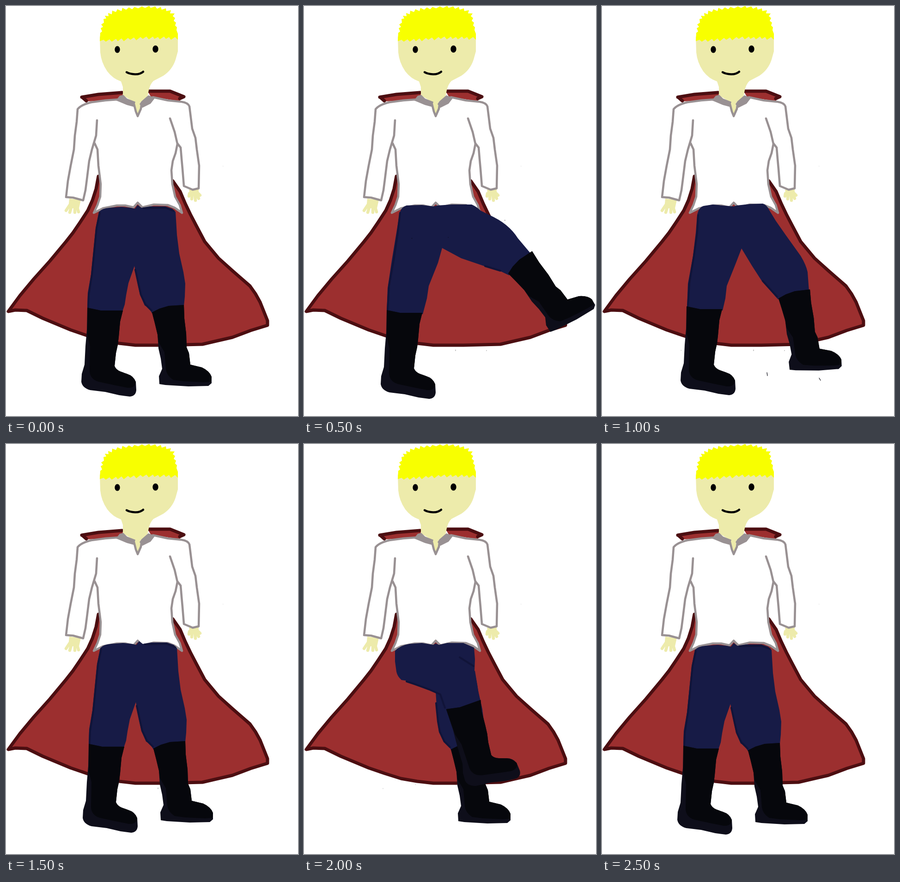
An HTML page for the animation above (3000 ms loop, 632x886 px).

```html
<!DOCTYPE html>
<html lang="en">
<head>
<meta charset="utf-8">
<title>Caped dancer</title>
<style>
  html, body { margin: 0; width: 100%; height: 100%; overflow: hidden; background: #fff; }
  svg { display: block; width: 632px; height: 886px; }
  .line { fill: none; stroke-linecap: round; stroke-linejoin: round; }
  .red { fill: #9c2f2f; }
  .rim { stroke: #4c0e11; stroke-width: 7; }
  .skin { fill: #edebab; }
  .finger { stroke: #edebab; stroke-width: 6.5; }
  .grey { fill: #999193; }
  .seam { stroke: #999193; stroke-width: 4.6; }
  .pants { fill: #171b46; }
  .fold { stroke: #111439; stroke-width: 4; }
  .shade { fill: #0e0e1a; }
  .boot { fill: #06070c; }
  .speck { stroke: #999; stroke-width: 1.2; }
  .dark { stroke: #0a0a14; }
  .pose { visibility: hidden; }
</style>
</head>
<body>
<svg viewBox="0 0 632 886">
  <defs>
    <g id="leftBoot">
      <path class="shade" d="M176 652L205 658 253 658 247 682 244 715 242 732 238 750 235 778Q238 786 248 790L262 795Q276 799 281 812L282 830Q281 843 268 844L245 841 215 834 182 830Q165 825 163 812L164 795 170 775 172 735 175 700Z"/>
      <path class="boot" d="M176 652L205 658 253 658 247 682 244 715 242 732 238 750 235 778Q238 786 248 790L262 795Q276 800 281 813 280 826 263 825L238 820 205 813Q183 809 181 790L182 735 176 710Z"/>
    </g>
    <g id="rightBoot">
      <path class="shade" d="M316 662L332 654 352 648 385 646 386 675 390 708 391 738 396 750 399 775 424 781Q441 789 445 801L445 815 438 821 395 822 345 819 332 817 331 800 338 784 335 762 330 740 328 710 322 685Z"/>
      <path class="boot" d="M316 662L332 654 352 648 385 646 386 675 390 708 391 738 396 750 399 775 424 781Q441 789 445 802L443 812 428 813 385 811 362 808Q348 799 346 785L343 748 330 726 328 710 322 685Z"/>
    </g>
    <g id="stance">
      <path class="pants" d="M201 445Q208 437 224 436L250 434 270 436 279 438 285 430 293 436 312 433 345 433 360 438 367 445 370 495 375 535 384 575 388 600 387 628 385 648 352 650 332 656 316 664 309 652 300 647 290 624 285 600 278 562 265 599 260 625 257 645 252 660 205 660 176 654 177 620 184 580 189 530 194 480Z"/>
      <path class="line fold" d="M203 447L196 480 191 530 186 580 179 625 178 652M280 570L287 602 292 624 302 645 315 658M298 437L345 436 363 443"/>
      <use href="#leftBoot"/>
      <use href="#rightBoot"/>
    </g>
  </defs>

  <!-- cape -->
  <path class="red" d="M200 366L190 410 178 442 160 468 130 509 95 551 60 590 5 660 45 657 80 675 140 700 210 723 280 733 345 733 425 731 490 716 566 690 566 680 550 640 528 605 490 572 460 545 430 509 412 475 399 450 377 401 361 378Z"/>
  <path class="line rim" d="M200 368L195 395 187 420 177 442 160 468 145 490 130 509 95 551 60 590 30 626 5 660 20 657 45 658 80 675 140 700 175 712 210 723 245 729 280 733 345 733 425 731 455 724 490 716 530 701 566 690 566 680 550 640 540 622 528 605 490 572 460 545 430 509 412 475 399 450 388 427 377 401 361 378"/>
  <path class="red" d="M166 196L252 186 254 202 178 206ZM307 185L356 184 384 196 376 205 316 200Z"/>
  <path class="line rim" d="M164 197L200 191 251 187M166 198L174 205M309 184L355 184 385 196 376 200"/>

  <!-- hands -->
  <path class="skin" d="M137 416L162 419 158 437 135 437ZM396 397L417 395 417 408 399 411Z"/>
  <path class="line finger" d="M138 430L130 442M142 432L138 446M149 432L149 446M153 431L157 445M397 405L396 411M403 406L402 417M409 407L410 420M413 406L417 416M414 403L420 409"/>

  <!-- shirt -->
  <path fill="#fff" d="M240 202L175 211 156 222 149 280 140 345 130 413 168 420 175 380 182 330 192 297 200 340 205 385 204 415 190 448 210 437 240 431 275 435 285 425 295 435 320 429 350 430 365 436 381 448 376 430 366 412 360 385 358 355 371 298 378 305 382 350 385 390 405 397 417 395 418 345 414 300 405 265 397 215 385 207 320 197Z"/>
  <path class="line seam" d="M242 202L215 204 185 208Q163 213 155 223L153 250 149 280 147 310 140 345 134 378 130 413 145 414 167 420 172 398 175 375 180 335 186 310 195 280 197 247M192 297L198 310 200 345 205 385 204 412 198 430 190 447 210 437 240 431 258 431 276 435 285 425 295 435 320 429 350 430 365 436 381 447 376 430 366 412 360 385 358 355 361 335 367 318 371 298 365 272 355 243M371 297L378 306 380 330 382 352 385 389 404 397 417 394 418 345 413 310 410 285 403 265 397 217Q394 209 380 207L350 204 318 197"/>

  <!-- head -->
  <path class="skin" d="M203 66L204 100Q206 122 219 141 231 157 249 163L253 175 253 193 276 207 280 222 285 237 290 222 291 208 306 196 309 182Q312 169 319 162L340 151Q360 138 367 116L372 98 372 66Z"/>
  <path class="grey" d="M238 204L246 194 254 192 262 200 280 207 277 218 262 214ZM289 212L293 206 308 193 323 198 313 211 295 220Z"/>
  <path class="line seam" d="M277 212L281 228 285 238 292 222 293 214"/>
  <path fill="#f8ff00" d="M203 76L204 58 208 55 205 48 210 45 206 40 212 36 211 28 217 27 214 21 222 22 221 15 229 18 230 10 238 13 241 7 250 11 252 4 260 8 266 3 273 7 278 2 286 5 294 1 301 4 310 0 313 4 323 1 327 6 335 2 337 8 346 5 347 11 357 9 355 16 365 16 361 22 366 26 363 32 368 36 366 42 370 46 369 52 372 60 372 73 366 67 357 73 353 67 346 71 342 66 333 72 329 67 321 71 318 66 309 72 304 66 296 71 291 67 282 74 277 68 269 73 264 69 255 76 250 70 242 76 238 71 229 77 224 72 216 77 211 73Z"/>
  <ellipse cx="241" cy="94" rx="5.7" ry="7.5"/>
  <ellipse cx="323.5" cy="93" rx="6.2" ry="7.8"/>
  <path class="line" stroke="#000" stroke-width="4.5" d="M261 143Q268 147 279 147.500 290 148 297 142"/>
  <path class="line speck" opacity=".4" d="M469.500 346h.5"/>

  <!-- legs -->
  <g class="pose" id="idle"><use href="#stance"/></g>

  <g class="pose" id="kick">
    <path class="pants" d="M207 447Q211 434 222 431L255 430 280 433 290 431 320 429 363 429Q374 434 382 442L398 450Q424 462 437 473 453 486 463 502L490 534 466 556 444 582 425 573 408 565 390 562 340 545 299 523 290 555 280 580 270 605 266 632 257 666 215 667 179 662 181 610 190 550 200 490Z"/>
    <path class="line fold" d="M208 447L203 490 194 550 184 605 181 656M392 562L425 572"/>
    <use href="#leftBoot" x="3" y="5"/>
    <use href="#rightBoot" transform="translate(442 578) rotate(-30) translate(-316 -662)"/>
    <path class="line speck" d="M328 743v2M395 744v1"/>
    <path class="line speck dark" d="M434.500 463h.5M233 502h1M312 500h.5"/>
  </g>

  <g class="pose" id="side">
    <path class="pants" d="M206 452Q209 435 220 432L240 429 270 432 285 433 292 431 320 428 348 427Q357 430 362 441L376 464 397 494 430 540Q442 560 445 575L448 615 420 617 381 634 365 616 347 596 325 562 302 524 290 555 280 580 270 605 267 632 261 658 215 658 184 652 186 600 197 540 203 490Z"/>
    <path class="line fold" d="M208 452L206 490 199 540 189 600 186 649M348 594L367 615 379 628"/>
    <use href="#leftBoot" x="7" y="-3"/>
    <use href="#rightBoot" transform="translate(382 632) rotate(-3) translate(-316 -662)"/>
    <path class="line speck" d="M328 743v2M395 744v1M171 744h.5"/>
    <path class="line speck dark" d="M357 792L358 799M470 804L473 809"/>
  </g>

  <g class="pose" id="step">
    <use href="#stance" x="3" y="-4"/>
    <path class="line speck" d="M329 743v2"/>
  </g>

  <g class="pose" id="lift">
    <path class="pants" d="M285 535L370 490 377 533 386 573 389 598 389 626 386 645 354 647 334 653 318 661 311 649 302 644 292 622 289 598Z"/>
    <path class="line fold" d="M286 560L290 600 294 622 304 643 316 655"/>
    <use href="#rightBoot" x="2" y="-2"/>
    <path class="pants" d="M197 447Q208 435 228 432L255 430 280 434 285 431 292 434 310 430 345 430 368 440 370 465 369 490 375 520 380 554 345 563 307 575 300 557 295 542 270 530 240 520 225 512 211 510Q202 502 200 492L197 470Z"/>
    <path class="line fold" d="M222 513L240 519 270 530 295 541 305 570"/>
    <path class="line fold" d="M337 461L367 480"/>
    <use href="#leftBoot" transform="translate(308 574) rotate(-19.5) translate(-176 -653)"/>
    <path class="line speck" opacity=".6" d="M171 744v1M241 736h1"/>
  </g>
</svg>
<script>
  const steps = ['idle', 'kick', 'side', 'step', 'lift', 'idle'];
  const hold = 500;

  for (const pose of document.querySelectorAll('.pose')) {
    const frames = [...steps, steps[0]].map((name, i) => ({
      offset: i / steps.length,
      visibility: name === pose.id ? 'visible' : 'hidden',
      easing: 'steps(1, end)'
    }));
    pose.animate(frames, { duration: steps.length * hold, iterations: Infinity });
  }
</script>
</body>
</html>
```
